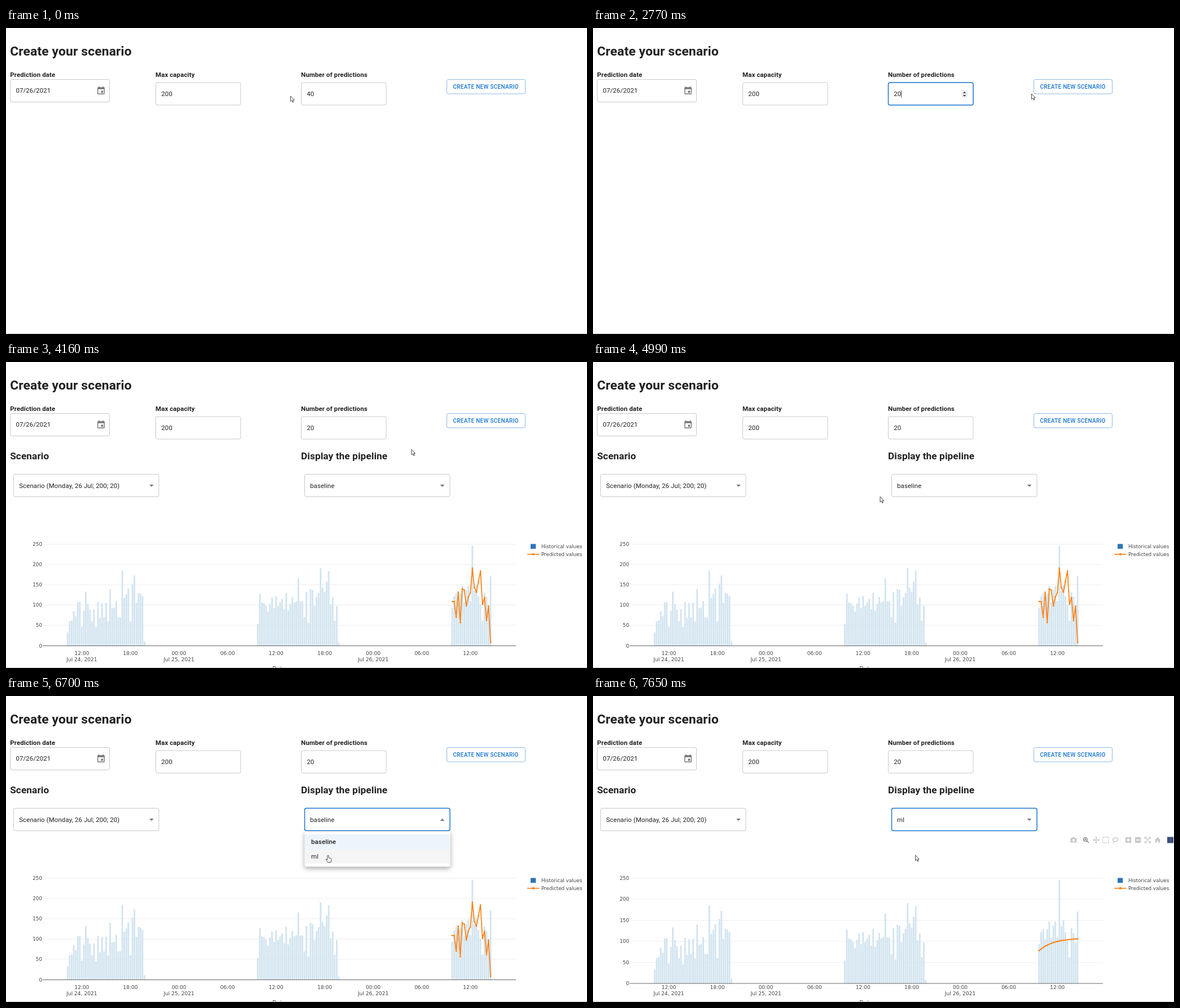
These frames come from a looping animation (1030x544 px, 7.99 s). An HTML page with a canvas:

```html
<!DOCTYPE html>
<html lang="en">
<head>
<meta charset="utf-8">
<title>Create your scenario</title>
<style>
  html, body { margin: 0; height: 100%; overflow: hidden; background: #fff; }
  canvas { display: block; }
</style>
</head>
<body>
<canvas id="stage" width="1030" height="544"></canvas>
<script>
const ctx = document.getElementById('stage').getContext('2d');
const LOOP = 7990;
const UI = 'Roboto, sans-serif', CHART = '"DejaVu Sans", sans-serif';
const INK = '#212121', BLUE = '#1976d2', ORANGE = '#ff7f0e', GREY = 'rgba(0,0,0,.54)';

// Moments, in ms
const FOCUS = 1210, TYPE_2 = 2090, TYPE_0 = 2230, PRESS = 3080, RESULT = 4000,
      OPEN = 6030, PICK = 7100, PICKED = 7170, REDRAW = 7400;

// Pointer stops: time, x, y
const stops = [
  [520, 504, 121], [1210, 545, 124], [1350, 545, 124], [1490, 518, 122], [1560, 526, 121],
  [2300, 526, 121], [2770, 777, 117], [2840, 784, 119], [3000, 795, 115], [3900, 795, 115],
  [4510, 600, 218], [4990, 508.5, 239.5], [5580, 508.5, 239.5], [5950, 572, 225],
  [6110, 572, 225], [6350, 573, 242], [6700, 571, 283]
];

// Quarter-hourly history: first bar in hours from the first tick, then values
const days = [
  [-1.75, [33, 60, 62, 85, 73, 107, 108, 47, 87, 133, 103, 89, 60, 90, 46, 108, 68, 105, 70, 106,
    60, 140, 92, 94, 110, 70, 70, 185, 118, 127, 141, 60, 153, 173, 106, 130, 128, 122, 11]],
  [21.75, [54, 128, 107, 105, 99, 84, 104, 119, 93, 122, 98, 107, 115, 90, 130, 87, 103, 120, 107, 110,
    166, 109, 109, 70, 132, 57, 140, 137, 98, 120, 130, 191, 143, 132, 158, 184, 102, 119, 62, 98, 8]],
  [45.75, [94, 122, 129, 105, 129, 147, 107, 137, 147, 110, 246, 136, 150, 122, 101, 62, 131, 120, 97, 171]]
];
const baseline = days[1][1].slice(-20);
const learned = baseline.map((_, i) => 78 + 30 * (1 - Math.exp(-i / 7)));

const shapes = {
  event: 'M17 12h-5v5h5v-5zM16 1v2H8V1H6v2H5c-1.11 0-1.99.9-1.99 2L3 19c0 1.1.89 2 2 2h14c1.1 0 2-.9 2-2V5c0-1.1-.9-2-2-2h-1V1h-2zm3 18H5V8h14v11z',
  arrow: 'M0 0V9.6L2.2 7.7 3.9 11.2 5.4 10.5 3.8 7.2H6.7Z',
  hand: 'M-1.1 1Q0-.9 1.1 1V4.8L5 5.7Q6 6.2 6 7.5L5 12.5H-.5L-3.8 8Q-3.6 6.3-2.1 7.3L-1.1 8.2Z',
  beam: 'M-1.5-5H1.5M0-5V5M-1.5 5H1.5'
};
// Chart toolbar: x, path, filled, opacity, dash
const tools = [
  [852, 'M-5.5-3.5h3l1-1.5h3l1 1.5h3v8h-11zM-2.2.5a2.2 2.2 0 1 0 4.4 0a2.2 2.2 0 1 0-4.4 0z', 1, .3],
  [874, 'M2.2-1a3.3 3.3 0 1 0-6.6 0a3.3 3.3 0 1 0 6.6 0M1.5 1.5L5 5M-2.6-1h3M-1.1-2.5v3', 0, .7],
  [892, 'M-5 0H5M0-5V5M-3.5-1.5L-5 0l1.5 1.5M3.5-1.5L5 0 3.5 1.5M-1.5-3.5L0-5l1.5 1.5M-1.5 3.5L0 5l1.5-1.5', 0, .3],
  [909, 'M-5-5H5V5H-5Z', 0, .3, [2, 1.3]],
  [926, 'M-3 3C-7-1-3-4 1-4S6 0 3 2-2 2-3 3s0 2-2 2', 0, .3],
  [949, 'M-5-5H5V5H-5ZM-3-1V1H-1V3H1V1H3V-1H1V-3H-1V-1Z', 1, .3],
  [966, 'M-5-5H5V5H-5ZM-3-1V1H3V-1Z', 1, .3],
  [983.5, 'M-5-5L5 5M5-5L-5 5M-5-2V-5H-2M2-5H5V-2M5 2V5H2M-2 5H-5V2', 0, .3],
  [1001, 'M0-5L5.5.5H4V5H1.2V1.5H-1.2V5H-4V.5H-5.5Z', 1, .3]
];

const clamp = v => Math.max(0, Math.min(1, v));
const inside = (p, x, y, w, h) => p.x > x && p.x < x + w && p.y > y && p.y < y + h;

function text(str, x, y, size = 11.46, color = INK, weight = 400, align = 'left', family = UI, spacing = .107) {
  ctx.font = `${weight} ${size}px ${family}`;
  ctx.letterSpacing = spacing + 'px';
  ctx.textAlign = align;
  ctx.fillStyle = color;
  ctx.fillText(str, x, y);
}
const bold = (str, x, y, size) => text(str, x, y, size, INK, 700);
const chartText = (str, x, y, size, align) => text(str, x, y, size, '#444', 400, align, CHART, 0);

function rect(x, y, w, h, color) {
  ctx.fillStyle = color;
  ctx.fillRect(x, y, w, h);
}

function box(x, y, w, h, color, width = 1, fill) {
  ctx.beginPath();
  ctx.roundRect(x, y, w, h, 3);
  if (fill) { ctx.fillStyle = fill; ctx.fill(); }
  ctx.strokeStyle = color;
  ctx.lineWidth = width;
  ctx.stroke();
}

function field(x, y, w, hover, focus) {
  box(x, y, w, 40, focus ? BLUE : hover ? INK : 'rgba(0,0,0,.21)', focus ? 1.5 : 1);
}

function shape(d, x, y, { scale = 1, fill, stroke, width = 1, dash = [] }) {
  const path = new Path2D(d);
  ctx.save();
  ctx.translate(x, y);
  ctx.scale(scale, scale);
  ctx.setLineDash(dash);
  ctx.lineJoin = 'round';
  if (fill) { ctx.fillStyle = fill; ctx.fill(path, 'evenodd'); }
  if (stroke) { ctx.strokeStyle = stroke; ctx.lineWidth = width; ctx.stroke(path); }
  ctx.restore();
}

function dot(x, y, r, color) {
  ctx.fillStyle = color;
  ctx.beginPath();
  ctx.arc(x, y, r, 0, 7);
  ctx.fill();
}

function pointerAt(t) {
  const i = stops.findIndex(s => s[0] > t);
  const [t1, x1, y1] = stops[i < 0 ? stops.length - 1 : i];
  if (i <= 0) return { x: x1, y: y1 };
  const [t0, x0, y0] = stops[i - 1];
  const u = (t - t0) / (t1 - t0), k = u * u * (3 - 2 * u);
  return { x: x0 + (x1 - x0) * k, y: y0 + (y1 - y0) * k };
}

function form(t, p) {
  bold('Create your scenario', 7.2, 49, 22.92);
  bold('Prediction date', 7.2, 87);
  bold('Max capacity', 265, 87);
  bold('Number of predictions', 523, 87);

  field(7.5, 91.5, 176);
  text('07/26/2021', 17.4, 115);
  shape(shapes.event, 159.9, 103, { scale: .716, fill: GREY });

  field(265.5, 97, 150.5);
  text('200', 275.3, 121);

  const hover = inside(p, 523, 97, 151, 40), focus = t >= FOCUS && t < PRESS;
  field(523.5, 97, 150.5, hover, focus);
  if (hover || focus) {
    box(653, 111, 11, 13, '#efefef', 0.5, '#efefef');
    shape('M-2.7-1.5L0-4.5 2.7-1.5ZM-2.7 1.5L0 4.5 2.7 1.5Z', 658.5, 117.5, { fill: '#444' });
  }
  const selected = t < TYPE_2 ? 13.2 * clamp((t - 1350) / 140) : 0;
  const value = t < TYPE_2 ? '40' : t < TYPE_0 ? '2' : '20';
  text(value, 533.2, 121);
  if (selected) {
    ctx.save();
    ctx.beginPath();
    ctx.rect(546.6 - selected, 110, selected, 14);
    ctx.clip();
    rect(533, 110, 14, 14, '#3390ff');
    text(value, 533.2, 121, 11.46, '#fff');
    ctx.restore();
  } else if (focus) {
    rect(533.2 + value.length * 6.55, 111, .8, 13, '#222');
  }

  const over = inside(p, 781, 91, 140, 25.6);
  box(781.5, 91.5, 139, 25.5, over ? BLUE : 'rgba(25,118,210,.5)', 1, over ? 'rgba(25,118,210,.04)' : '');
  const ripple = (t - PRESS) / 550;
  if (ripple > 0 && ripple < 1) {
    ctx.save();
    ctx.clip();
    dot(795, 115, 130 * Math.sqrt(ripple), `rgba(25,118,210,${.26 * clamp(2 - 2 * ripple)})`);
    ctx.restore();
  }
  text('CREATE NEW SCENARIO', 792.4, 108, 10.02, BLUE, 500, 'left', UI, .286);
}

function selects(t, p) {
  bold('Scenario', 7.2, 173, 17.19);
  bold('Display the pipeline', 523, 173, 17.19);
  field(13.5, 199.5, 257.5);
  text('Scenario (Monday, 26 Jul; 200; 20)', 23.2, 224);
  shape('M-3.8-1.9H3.8L0 1.9Z', 258, 220, { fill: GREY });
  field(529.5, 199.5, 257.5, inside(p, 529, 199, 258, 41), t >= OPEN);
  text(t < PICKED ? 'baseline' : 'ml', 539, 224);
  const opened = t >= OPEN && t < PICK;
  shape(opened ? 'M-3.8 1.9H3.8L0-1.9Z' : 'M-3.8-1.9H3.8L0 1.9Z', 773.5, 220, { fill: GREY });
}

function chart(t) {
  const redrawn = t >= REDRAW;
  const zero = redrawn ? 511 : 504.5, unit = (zero - 324) / 250, hour = 14.35;
  const px = h => 134.4 + h * hour, py = v => zero - v * unit;

  for (let v = 0; v <= 250; v += 50) {
    if (v) rect(66, Math.round(py(v)) - .5, 838, 1, '#eee');
    chartText(v, 64, Math.round(py(v) + 3), 8.8, 'right');
  }
  for (const [start, values] of days)
    values.forEach((v, i) => rect(px(start + i / 4) - 1.43, py(v), 2.87, v * unit, '#d2e4f0'));
  rect(65, zero - .5, 839, 1, '#666');

  const points = (redrawn ? learned : baseline).map((v, i) => [px(45.75 + i / 4), py(v)]);
  ctx.strokeStyle = ORANGE;
  ctx.lineWidth = 1.7;
  ctx.lineJoin = 'round';
  ctx.beginPath();
  points.forEach(([x, y]) => ctx.lineTo(x, y));
  ctx.stroke();
  points.forEach(([x, y]) => dot(x, y, 1.3, ORANGE));

  for (let i = 0; i < 9; i++)
    chartText(['12:00', '18:00', '00:00', '06:00'][i % 4], px(i * 6), 521, 9, 'center');
  [0, 12, 36].forEach((h, i) => chartText(`Jul ${24 + i}, 2021`, px(h), 532, 9.1, 'center'));
  chartText('Date', 484, 549, 10, 'center');

  rect(930, 323.5, 9.3, 8.6, '#2f74b9');
  chartText('Historical values', 949, 331, 8.75);
  rect(924, 341, 21.5, 1.6, ORANGE);
  dot(934.8, 341.8, 2.1, ORANGE);
  chartText('Predicted values', 949, 345, 8.75);
}

function toolbar(t) {
  const shown = clamp((t - 7330) / 250);
  for (const [x, d, filled, alpha, dash] of tools) {
    ctx.globalAlpha = shown * alpha;
    shape(d, x, 256, filled ? { fill: '#444' } : { stroke: '#444', width: 1.3, dash });
  }
  ctx.globalAlpha = shown;
  rect(1018, 250.5, 11, 11, '#3f4f75');
  ctx.globalAlpha = 1;
}

function menu(t, p) {
  const grow = clamp((t - OPEN) / 230), show = grow * clamp(1 - (t - PICK) / 220);
  if (!show) return;
  const ease = 1 - (1 - grow) ** 3;
  ctx.save();
  ctx.globalAlpha = show;
  ctx.translate(658.5, 240);
  ctx.scale(.75 + .25 * ease, .56 + .44 * ease);
  ctx.translate(-658.5, -240);
  ctx.shadowColor = 'rgba(0,0,0,.36)';
  ctx.shadowBlur = 8;
  ctx.shadowOffsetY = 3;
  ctx.fillStyle = '#fff';
  ctx.beginPath();
  ctx.roundRect(529.5, 240.5, 258, 63, 3);
  ctx.fill();
  ctx.shadowColor = 'transparent';
  const onSecond = p.y > 272;
  rect(529.5, 246, 258, 26, p.y > 246 && !onSecond ? '#e3eefa' : '#edf4fb');
  if (onSecond) rect(529.5, 272, 258, 26, '#f5f5f5');
  text('baseline', 541, 263, 11.46, INK, 500);
  text('ml', 541, 289);
  ctx.restore();
}

function pointer(t, p) {
  const ready = t >= RESULT;
  const hand = inside(p, 781, 91, 140, 25.6)
    || ready && inside(p, 529, 199, 258, 41)
    || t > OPEN && t < PICK + 220;
  if (hand) shape(shapes.hand, p.x, p.y, { fill: '#fff', stroke: '#333', width: .9 });
  else if (!ready && inside(p, 517, 97, 157, 40)) shape(shapes.beam, p.x, p.y, { stroke: '#446', width: .9 });
  else shape(shapes.arrow, p.x + .5, p.y, { fill: '#fff', stroke: '#333', width: .9 });
}

function draw() {
  const t = performance.now() % LOOP, p = pointerAt(t);
  rect(0, 0, 1030, 544, '#fff');
  form(t, p);
  if (t >= RESULT) {
    selects(t, p);
    chart(t);
    toolbar(t);
    menu(t, p);
  }
  rect(0, 543, 1030, 1, '#ccc');
  pointer(t, p);
  requestAnimationFrame(draw);
}
draw();
</script>
</body>
</html>
```
